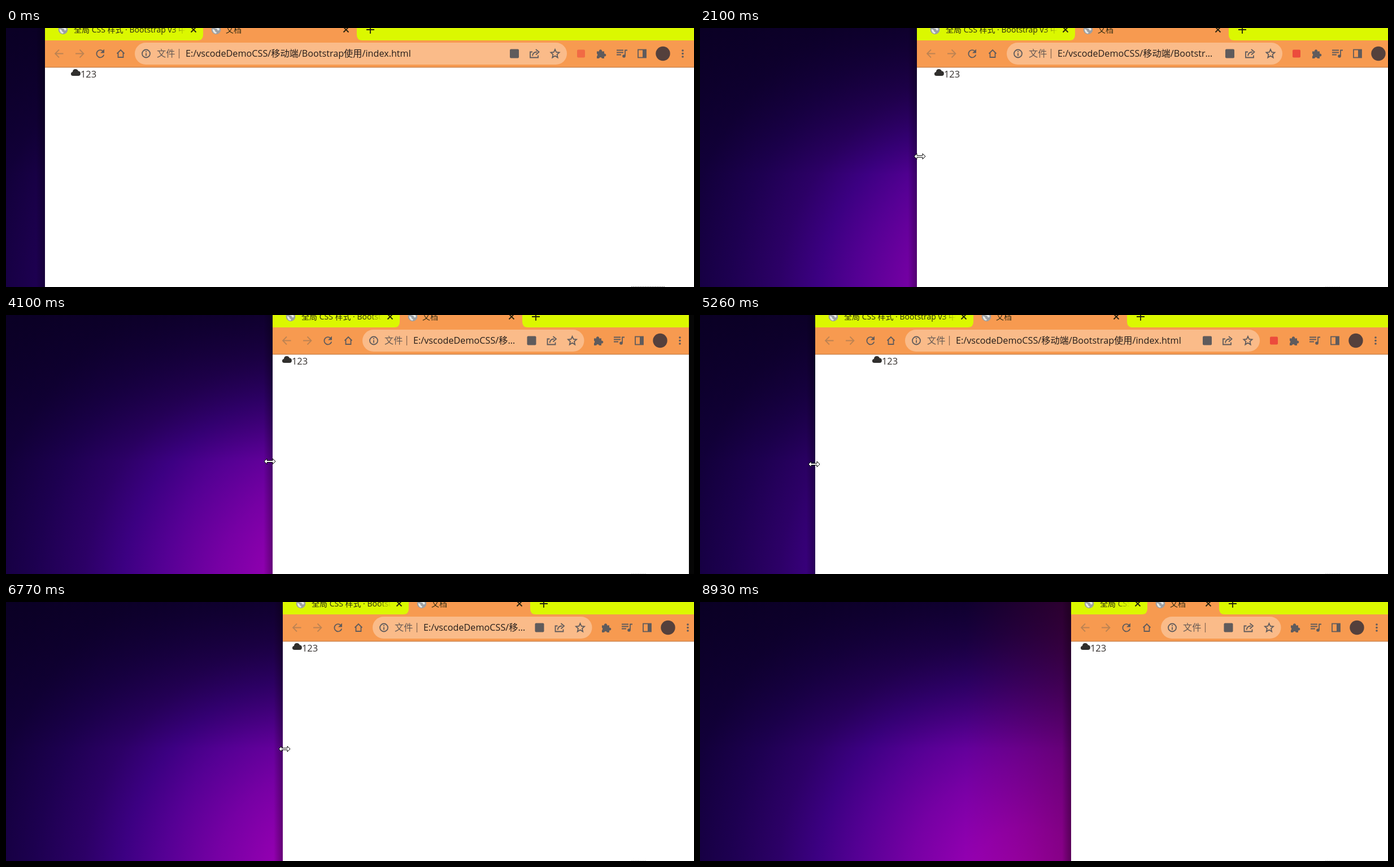
Write an HTML page that moves like this. It is 1218 px wide and 460 px high and loops after 9000 ms.

```html
<!DOCTYPE html>
<html lang="zh-CN">
<head>
<meta charset="utf-8">
<title>窗口缩放</title>
<style>
html, body { margin: 0; width: 100%; height: 100%; overflow: hidden; background: #0b002b; }
svg { display: block; width: 1218px; height: 460px; }
text { font-family: "Open Sans", "Noto Sans CJK SC", "Noto Sans CJK", sans-serif; white-space: pre; }
.line { fill: none; stroke: #5f5b5c; stroke-width: 1.8; }
.solid { fill: #5f5b5c; }
.dim { stroke: #bd8352; }
.tab { font-size: 14px; fill: #2c2a12; }
.bar { font-size: 16.2px; }
.cross { fill: none; stroke: #22200e; stroke-width: 1.8; }
</style>
</head>
<body>
<svg viewBox="0 0 1218 460">
  <defs>
    <radialGradient id="glow" gradientUnits="userSpaceOnUse" cx="580" cy="500" r="780">
      <stop offset="0" stop-color="#a600b8"/>
      <stop offset=".13" stop-color="#9600b2"/>
      <stop offset=".27" stop-color="#7600a4"/>
      <stop offset=".39" stop-color="#550094"/>
      <stop offset=".48" stop-color="#3c0082"/>
      <stop offset=".57" stop-color="#2c0066"/>
      <stop offset=".68" stop-color="#1d0050"/>
      <stop offset=".8" stop-color="#12003a"/>
      <stop offset="1" stop-color="#0b002b"/>
    </radialGradient>
    <linearGradient id="dusk" x1="0" y1="0" x2="0" y2="1">
      <stop offset="0" stop-color="#0a0022" stop-opacity=".75"/>
      <stop offset="1" stop-color="#0a0022" stop-opacity="0"/>
    </linearGradient>
    <linearGradient id="wine">
      <stop offset="0" stop-color="#600030" stop-opacity="0"/>
      <stop offset="1" stop-color="#600030" stop-opacity=".4"/>
    </linearGradient>
    <linearGradient id="shade">
      <stop offset="0" stop-color="#000" stop-opacity="0"/>
      <stop offset="1" stop-color="#000" stop-opacity=".32"/>
    </linearGradient>
    <linearGradient id="fade">
      <stop offset="0" stop-color="#dbf800" stop-opacity="0"/>
      <stop offset="1" stop-color="#dbf800"/>
    </linearGradient>
    <g id="globe">
      <circle r="8.3" fill="#9b9fa3"/>
      <path d="M-6.5-1Q-3-1-2 2T1 4L0 7Q-6 6-6.5-1ZM0-6Q5-5 6 0Q3 3 2 0T-2-2Z" fill="#e6e8e4"/>
    </g>
    <path id="cross" class="cross" d="M-4.5-4.5L4.5 4.5M4.5-4.5L-4.5 4.5"/>
  </defs>

  <rect width="1218" height="460" fill="url(#glow)"/>
  <rect width="1218" height="260" fill="url(#dusk)"/>
  <rect x="470" width="200" height="460" fill="url(#wine)"/>

  <g id="win">
    <rect x="-16" width="16" height="460" fill="url(#shade)"/>
    <rect width="1218" height="460" fill="#fff"/>
    <rect width="1218" height="22" fill="#dbf800"/>
    <rect y="22" width="1218" height="48" fill="#f79a50"/>
    <rect y="69" width="1218" height="1.4" fill="#cb8148"/>

    <use href="#globe" x="32" y="3"/>
    <text class="tab" x="51" y="8">全局 CSS 样式 · Bootstrap v3 中</text>
    <g id="fader">
      <rect x="-24" width="24" height="21" fill="url(#fade)"/>
      <rect x="-.5" width="60" height="21" fill="#dbf800"/>
      <use href="#cross" x="14" y="3"/>
    </g>
    <path id="active" fill="#f79a50"/>
    <g id="second">
      <use href="#globe" x="32" y="3"/>
      <text class="tab" x="49" y="8">文档</text>
    </g>
    <g id="ends">
      <use href="#cross" x="-9" y="3"/>
      <path class="cross" d="M27 3H41M34-4V10" stroke-width="2"/>
    </g>

    <g transform="translate(0 45.5)">
      <path class="line dim" d="M32.5 0H18M25-7L18 0L25 7M54 0H68.500M61.500-7L68.500 0L61.500 7"/>
      <path class="line" d="M103-4A6.600 6.600 0 1 0 104.300 2"/>
      <path class="solid" d="M105-8V-1H98Z"/>
      <path class="line" d="M127.500 0L134-6.500L140.500 0M129.500-1.500V6.500H138.500V-1.500"/>
    </g>
    <rect id="omni" x="159" y="26" height="39" rx="19.5" fill="#fabb89"/>
    <circle class="line" cx="179" cy="45.500" r="7"/>
    <path class="line" d="M179 44.500V49.500M179 41V43"/>
    <text class="bar" x="198" y="51" fill="#655a55">文件</text>
    <path d="M237.500 37V54" stroke="#8c6a54" stroke-width="1.300"/>
    <text class="bar" id="url" x="249" y="51" fill="#241d1a"></text>

    <g id="page">
      <path d="M4 85Q0 85 0 81.500Q0 78.500 3 78Q3.500 73 8 73Q12 73 13 76.500Q17 76.500 17 81Q17 85 13 85Z" fill="#302f2d"/>
      <text x="17" y="88" font-size="16.500" fill="#35302e">123</text>
    </g>
  </g>

  <g id="tools">
    <rect class="solid" x="-101" y="-8" width="16" height="16" rx="2"/>
    <path class="line" d="M-61-3H-65V7H-51V3M-61 4Q-60-3-53-3M-55-7.500L-49.500-3L-55 2"/>
    <path class="line" stroke-width="1.600" d="M-21-7.500L-18.800-2.500L-13.500-2L-17.500 1.500L-16.300 7L-21 4L-25.700 7L-24.500 1.500L-28.500-2L-23.200-2.500Z"/>
  </g>
  <g id="exts">
    <rect id="badge" x="-187" y="-7" width="14" height="14" rx="2" fill="#ec4b3c"/>
    <path class="solid" d="M-152-4H-148A2.600 2.600 0 1 1-143-4H-139V0A2.600 2.600 0 1 1-139 5V8.500H-143A2.600 2.600 0 0 0-148 8.500H-152V4.500A2.600 2.600 0 0 0-152 0Z"/>
    <path class="line" d="M-117-6H-105M-117-2H-105M-117 2H-109M-102 4V-6H-98"/>
    <circle class="solid" cx="-104" cy="4.500" r="2.800"/>
    <rect class="line" x="-79" y="-7" width="14" height="14"/>
    <rect class="solid" x="-71" y="-7" width="6" height="14"/>
    <circle cx="-35" r="12.700" fill="#54403c"/>
    <g class="solid"><circle cy="-5.500" r="1.800"/><circle r="1.800"/><circle cy="5.500" r="1.800"/></g>
  </g>

  <rect id="gap" y="0" width="40" height="460" fill="#060606"/>
  <path id="speck" stroke-dasharray="2 1" stroke-width="1"/>
  <g id="cursor" stroke="#000" fill="#fff">
    <path id="arrow" d="M.5.500V16L4 12.700L6.500 18L9 17L6.700 11.700H11.500Z"/>
    <path id="sizer" d="M-10 0L-5-5V-1.500H5V-5L10 0L5 5V1.500H-5V5Z"/>
  </g>
</svg>
<script>
const LOOP = 9000, START = 69, MAX_LEFT = 657, DOTS = 1198;
const URL_TEXT = "E:/vscodeDemoCSS/移动端/Bootstrap使用/index.html";

// Drags: first step, last step, pointer positions of the left window edge
const drags = [
  [1540, 2390, [55, 60, 95, 150, 215, 280, 346, 384, 420, 455, 482, 495]],
  [2480, 3300, [508, 535, 565, 598, 630, 652, 680, 700, 708, 706, 702, 700]],
  [3480, 4330, [690, 672, 650, 620, 590, 560, 530, 500, 472, 455, 438, 424]],
  [4400, 5260, [408, 388, 368, 346, 324, 302, 282, 262, 244, 228, 214, 204]],
  [5370, 5590, [190, 168, 150, 144]],
  [5970, 6840, [150, 172, 205, 245, 290, 335, 380, 420, 455, 481, 490, 505]],
  [6920, 7530, [515, 535, 560, 590, 625, 655, 680, 695, 690]]
];
const stepTime = (a, b, i, n) => Math.round((a + (b - a) * i / (n - 1)) / 10) * 10;
const steps = [{ t: 0, x: START }];
for (const [a, b, xs] of drags)
  xs.forEach((x, i) => steps.push({ t: stepTime(a, b, i, xs.length), x }));

// Pointer path before the first drag: time, x, y
const approach = [
  [70, 900, 400], [150, 560, 300], [230, 286, 230],
  [380, 250, 212], [460, 200, 195], [530, 150, 184], [610, 110, 190],
  [690, 86, 204], [760, 65, 221], [840, 67, 221], [1160, 70, 221]
];
// Height and horizontal offset of the pointer while dragging
const hold = [[1540, 221, 0], [2100, 228, 5], [3020, 234, 2], [3480, 254, 0], [4100, 260, -5],
  [5260, 265, -2], [6770, 261, 3], [7530, 262, 0], [9000, 262, 0]];

const $ = id => document.getElementById(id);
const set = (id, name, value) => $(id).setAttribute(name, value);
const move = (id, x, y = 0) => set(id, "transform", `translate(${x} ${y})`);
const show = (id, on) => set(id, "visibility", on ? "visible" : "hidden");

const pen = document.createElement("canvas").getContext("2d");
pen.font = '16.2px "Open Sans", "Noto Sans CJK SC", "Noto Sans CJK", sans-serif';
const widthOf = s => pen.measureText(s).width;

function fit(text, room) {
  if (widthOf(text) <= room) return text;
  for (let n = text.length - 1; n > 0; n--) {
    const cut = text.slice(0, n) + "…";
    if (widthOf(cut) <= room) return cut;
  }
  return "";
}

function pointer(t, x) {
  if (t < 70) return null;
  if (t < 1540) {
    const [, px, py] = approach.filter(p => p[0] <= t).pop();
    return { x: px, y: py, arrow: t < 760 };
  }
  if (t >= 7760) {
    const k = Math.floor((t - 7760) / 78.2) + 1;
    if (k > 11) return null;
    return { x: 690 + 41 * k, y: 254 + 18.500 * k, arrow: true };
  }
  const i = hold.findIndex(h => h[0] > t);
  const [t0, y0, d0] = hold[i - 1], [t1, y1, d1] = hold[i];
  const p = (t - t0) / (t1 - t0);
  return { x: x + d0 + (d1 - d0) * p, y: Math.round(y0 + (y1 - y0) * p), arrow: false };
}

function draw(t) {
  const i = steps.findLastIndex(s => s.t <= t);
  const now = steps[i], prev = steps[Math.max(0, i - 1)];
  const left = Math.min(MAX_LEFT, now.x);
  const delta = left - Math.min(MAX_LEFT, prev.x);
  // The layout trails behind the moving edge
  const lag = Math.round(delta > 0 ? delta : delta * .18);
  const dots = DOTS + lag, span = dots - left;

  const tab = Math.min(271, (span - 289) / 2);
  const a = tab + 9, b = 2 * tab + 10;
  move("win", left);
  move("fader", tab - 22);
  set("active", "d", `M${a - 10} 22Q${a} 22 ${a} 12V0H${b}V12Q${b} 22 ${b + 10} 22Z`);
  move("second", tab);
  move("ends", 2 * tab);

  const wide = span >= 790;
  const end = dots - (wide ? 205 : 169.5);
  set("omni", "width", end - left - 159);
  $("url").textContent = fit(URL_TEXT, end - 117 - left - 249);
  move("tools", end, 45.500);
  move("exts", dots, 45.500);
  show("badge", wide);
  set("badge", "opacity", t < 1540 ? .6 : 1);

  const view = span + 20;
  const box = view >= 1116 ? 1091 : view >= 864 ? 844 : view;
  move("page", (view - box) / 2 + 16.9);

  show("gap", lag < -3);
  set("gap", "x", 1214 + lag);
  set("speck", "d", t < 1540 ? "M1107 459.500H1167" : "M1107 459.500H1133");
  set("speck", "stroke", t < 1540 ? "#8a8a8a" : "#d8d8d8");

  const c = pointer(t, now.x);
  show("arrow", c && c.arrow);
  show("sizer", c && !c.arrow);
  if (c) move("cursor", c.x, c.y);
}

const begin = performance.now();
function tick() {
  draw((performance.now() - begin) % LOOP);
  requestAnimationFrame(tick);
}
tick();
</script>
</body>
</html>
```
